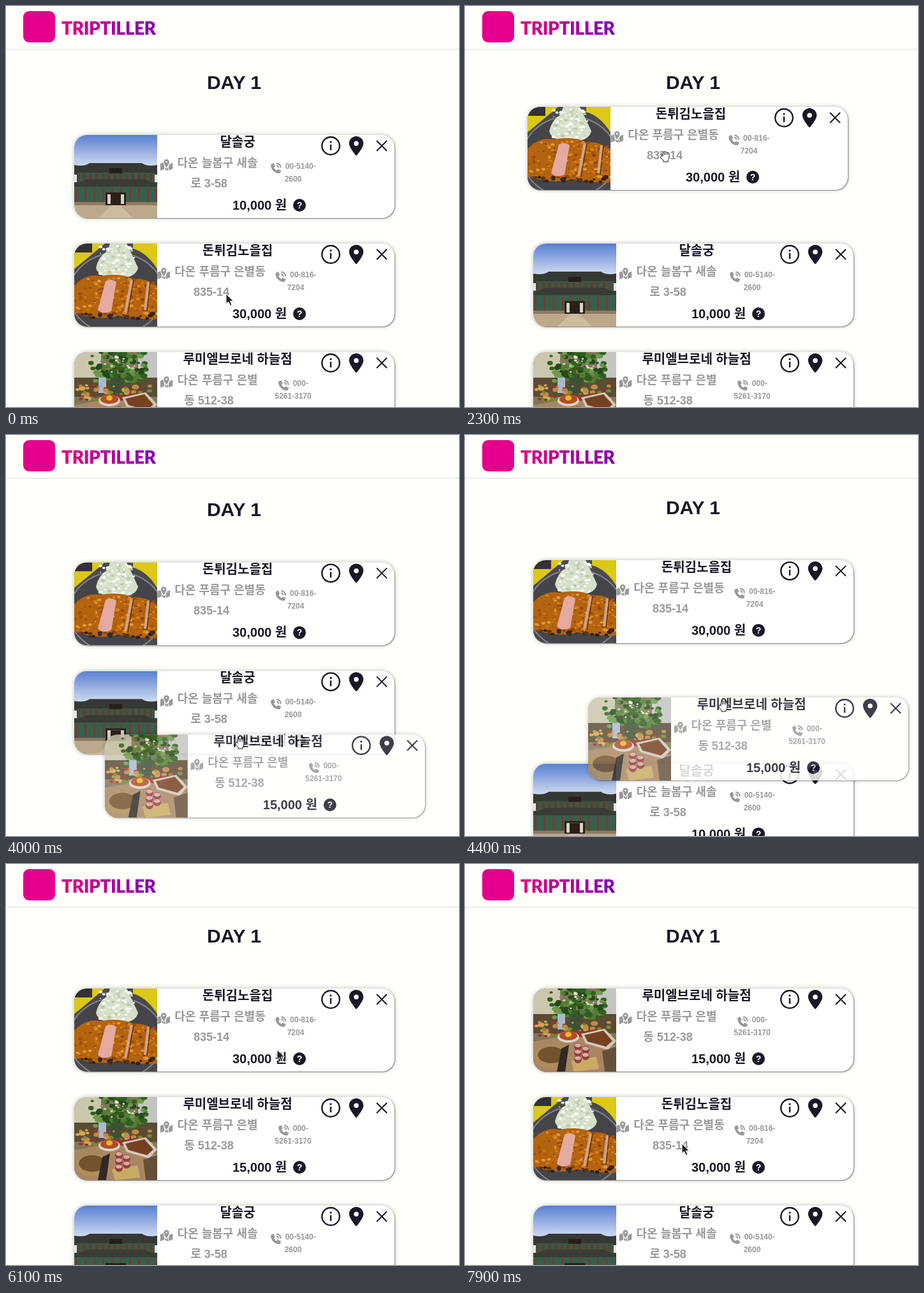
Recreate the animation shown at these times as an HTML page. Size 710 by 628 pixels, loop 8 s.

```html
<!DOCTYPE html>
<html lang="ko">
<head>
<meta charset="utf-8">
<title>Trip plan</title>
<style>
html, body { margin: 0; width: 100%; height: 100%; overflow: hidden; background: #fffffb; }
body { position: relative; font: bold 18px "Liberation Sans", "Noto Sans CJK KR", "Noto Sans CJK", sans-serif; color: #1a1727; }
header { position: absolute; left: 0; top: 0; width: 100%; height: 67px; background: #fffffb; border-bottom: 1px solid #e6e6e3; box-shadow: 0 1px 2px rgba(0,0,0,.06); }
.mark { position: absolute; left: 27px; top: 8px; width: 50px; height: 49px; border-radius: 9px; background: #e4008c; }
.brand { position: absolute; left: 87px; top: 17px; font: 900 28px/34px Lato, "Open Sans", sans-serif; letter-spacing: -.4px; color: transparent; background: linear-gradient(90deg, #e6007e, #8200b8); -webkit-background-clip: text; background-clip: text; }
#page { position: absolute; left: 0; top: 0; width: 710px; height: 628px; }
h1 { position: absolute; left: 0; top: 103px; width: 715px; margin: 0; font-size: 30px; line-height: 34px; text-align: center; }
.card { position: absolute; left: 107px; top: 0; width: 502px; height: 130px; border-radius: 20px; overflow: hidden; background: #fffffd; box-shadow: 1px 1px 1px rgba(0,0,0,.4), 0 0 7px rgba(0,0,0,.28); }
.photo, .tools { position: absolute; left: 0; top: 0; }
.row { position: absolute; transform: translateX(-50%); white-space: nowrap; text-align: center; }
.row svg { margin: -2px 2px -2px 0; }
.title { left: 256px; top: -1px; font-size: 20px; line-height: 24px; }
.address { top: 28px; line-height: 32px; color: #999; }
.address svg { vertical-align: -4px; }
.phone { top: 39px; font-size: 12px; line-height: 20px; color: #999; }
.phone svg { vertical-align: -6px; }
.price { left: 248px; top: 98px; font-size: 20px; line-height: 24px; position: absolute; white-space: nowrap; }
.help { position: absolute; left: 343px; top: 100px; width: 20px; border-radius: 50%; background: #1a1727; color: #fff; font-size: 14px; line-height: 20px; text-align: center; }
#cursor { position: absolute; left: 0; top: 0; overflow: visible; z-index: 9; }
</style>
</head>
<body>
<div id="page"><h1>DAY 1</h1></div>
<header><div class="mark"></div><div class="brand">TRIPTILLER</div></header>
<svg id="cursor" width="1" height="1">
  <path id="arrow" d="M0 0V15.500L3.700 12.200L6.300 18.300L9 17.100L6.400 11.200H11.500Z" fill="#222" stroke="#fff"/>
  <g id="hand" stroke="#111" stroke-linejoin="round" fill="#fff">
    <path d="M-3 6Q-3 4-1 4V2Q-1 0 1 0Q2-1 3.500 0Q5-1 6 .5Q9 0 9 3V8Q9 11 7 13V15H0V13L-4 8.500Q-5 6.500-3 6Z"/>
    <path d="M1.500 1V4M4 1V4M6.500 1.500V4M-1 4V7" fill="none"/>
  </g>
</svg>
<script>
const LOOP = 8000, STEP = 100, HEIGHT = 130, PITCH = 170;
const el = id => document.getElementById(id);
const slotY = i => 202 + PITCH * i;
const mix = (a, b, p) => a + (b - a) * p;
const clamp = p => Math.min(1, Math.max(0, p));
const easeOut = p => 1 - (1 - clamp(p)) ** 3;

// Photos
const box = (x, y, w, h, fill) => `<rect x="${x}" y="${y}" width="${w}" height="${h}" fill="${fill}"/>`;
const shape = (d, fill) => `<path d="${d}" fill="${fill}"/>`;
const oval = (cx, cy, rx, ry, fill, more = '') => `<ellipse cx="${cx}" cy="${cy}" rx="${rx}" ry="${ry}" fill="${fill}" ${more}/>`;
const repeat = (n, fn) => Array.from({ length: n }, (_, i) => fn(i)).join('');

function dots(n, seed, [x, y, w, h], size, colors) {
  const rnd = () => (seed = seed * 16807 % 2147483647) / 2147483647;
  return repeat(n, () => {
    const r = size * (.5 + rnd());
    return oval(x + rnd() * w, y + rnd() * h, r, r * .7, colors[rnd() * colors.length | 0]);
  });
}

const photos = {
  hall: '<linearGradient id="sky" x2="0" y2="1"><stop stop-color="#587fd2"/><stop offset=".42" stop-color="#dfe7f3"/></linearGradient>'
    + box(0, 0, 130, 130, 'url(#sky)')
    + shape('M0 47Q16 50 24 44H106Q114 50 130 47V62H0Z', '#363834')
    + box(4, 59, 122, 15, '#3f5545')
    + repeat(13, i => box(5 + i * 9.5, 61, 3, 11, '#643a2b'))
    + box(55, 52, 20, 8, '#252018')
    + shape('M0 74Q12 74 20 69H110Q118 74 130 74V82H0Z', '#393c35')
    + box(0, 81, 130, 29, '#375f4d')
    + repeat(10, i => box(2 + i * 14, 83, 3, 26, '#793a2c'))
    + box(0, 105, 130, 5, '#8f7962')
    + box(49, 90, 32, 20, '#2b2018') + box(52, 93, 26, 15, '#d8d2c5') + box(57, 93, 16, 17, '#2b2018')
    + box(0, 110, 130, 20, '#bca98b')
    + shape('M58 110H72L92 130H38Z', '#cdbc9d'),
  cutlet: box(0, 0, 130, 130, '#4a4a4e')
    + shape('M0 0H48L0 40ZM92 0H130V40Q114 14 92 8Z', '#dcc816') + box(0, 0, 28, 14, '#34303a')
    + oval(66, 78, 74, 63, '#444449', 'stroke="#85858c" stroke-width="2"')
    + shape('M34 38Q38 20 52 12L56 0H82Q90 16 100 38Q96 55 66 54Q38 54 34 38Z', '#d5dfc9')
    + dots(80, 71, [40, 2, 54, 48], 2.2, ['#f4f6ee', '#e3ead9', '#bac8ac', '#fff'])
    + shape('M0 66Q18 46 42 51Q70 45 92 55Q116 54 130 68V118Q100 120 70 113Q38 122 0 108Z', '#b4630f')
    + dots(170, 17, [0, 54, 130, 58], 2.2, ['#d88118', '#a14f08', '#c97210', '#8c4308', '#e39a34'])
    + shape('M49 59Q58 54 66 60L58 106Q46 112 37 104Z', '#e3aaa2')
    + '<path d="M90 57L80 108M116 60L111 104" stroke="#cfa48e" stroke-width="4"/><path d="M93 57L84 110M119 60L114 106" stroke="#4a2408"/>'
    + dots(24, 9, [3, 109, 120, 9], 3, ['#2c1c10', '#5d3510', '#332a25']),
  buffet: box(0, 0, 130, 130, '#807759')
    + box(0, 0, 42, 48, '#cbc7ac') + box(100, 0, 30, 58, '#c3c5c2') + box(0, 40, 130, 30, '#5a4b35')
    + dots(100, 47, [26, 0, 86, 46], 4.5, ['#315f20', '#4b8030', '#26491b', '#6e994b'])
    + dots(14, 93, [48, 2, 50, 30], 2, ['#e9edd9', '#c2d3a0'])
    + box(38, 40, 12, 24, '#aab9d0') + box(57, 40, 20, 24, '#3d5034')
    + dots(55, 57, [2, 52, 120, 25], 4, ['#c18a45', '#813c20', '#d5a653', '#728c31', '#a62e26'])
    + shape('M0 83L35 77L80 76L130 90V130H0Z', '#a98663')
    + oval(55, 76, 17, 9, '#d8d4c6') + oval(55, 74, 14, 7, '#b44a28') + oval(55, 72, 5, 4, '#e9bb25')
    + shape('M75 71L112 63L130 82L117 96L82 86Z', '#d0cabc') + shape('M80 73L110 66L124 82L114 91L85 83Z', '#774021')
    + oval(28, 107, 25, 18, '#b08d58') + oval(28, 104, 21, 13, '#72532d')
    + shape('M37 130L44 94L56 88L50 130Z', '#302a24') + shape('M59 113L99 107L103 126L64 130Z', '#c9aa63')
    + repeat(5, i => oval(70 + i % 2 * 12, 91 + i * 5, 6, 6, '#8f3f40') + oval(70 + i % 2 * 12, 89 + i * 5, 5, 3, '#dda99b'))
    + shape('M108 98L130 91V130H112Z', '#67503a')
};

// Cards
const mapIcon = '<svg width="20" height="18"><path fill="#999" fill-rule="evenodd" d="M0 7L5 5Q5.500 9 6.500 10.500V15.500L0 18ZM7.500 12L10 15L12.500 12V18L7.500 16ZM13.500 11L15 7.500L20 5.500V15L13.500 17.500ZM10 13Q5.800 8 5.800 4.200A4.200 4.200 0 0 1 14.200 4.200Q14.200 8 10 13ZM10 2.800a1.400 1.400 0 1 0 .01 0Z"/></svg>';
const phoneIcon = '<svg width="18" height="18"><path fill="#999" d="M1 3L5 1L7.500 6L5.500 8Q7 11 10 12.500L12 10.500L17 13L15 17Q8 18 3.500 12Q0 7 1 3Z"/><path fill="none" stroke="#999" stroke-width="2" d="M9.500 1.500A7 7 0 0 1 16.500 8.500M9.500 5A3.500 3.500 0 0 1 13 8.500"/></svg>';
const tools = `<svg class="tools" width="502" height="40" fill="#1a1727">
  <g fill="none" stroke="#1a1727" stroke-width="2.400">
    <circle cx="402" cy="17" r="13.800"/><path d="M402 15V24"/><path stroke-width="2" d="M474 9L490 25M490 9L474 25"/>
  </g>
  <circle cx="402" cy="11" r="1.600"/>
  <path fill-rule="evenodd" transform="translate(430.750 2) scale(.0586)" d="M216 499C267 435 384 279 384 192C384 86 298 0 192 0S0 86 0 192C0 279 117 435 168 499C181 515 203 515 216 499ZM192 128a64 64 0 1 1 0 128a64 64 0 1 1 0-128Z"/>
</svg>`;

// The shift is how far the centred address and phone sit to the right.
const places = [
  { title: '달솔궁', photo: 'hall', price: '10,000 원', address: ['다온 늘봄구 새솔', '로 3-58'], phone: ['00-5140-', '2600'], shift: 0 },
  { title: '돈튀김노을집', photo: 'cutlet', price: '30,000 원', address: ['다온 푸름구 은별동', '835-14'], phone: ['00-816-', '7204'], shift: 4 },
  { title: '루미엘브로네 하늘점', photo: 'buffet', price: '15,000 원', address: ['다온 푸름구 은별', '동 512-38'], phone: ['000-', '5261-3170'], shift: 0 }
];

function makeCard({ title, photo, price, address, phone, shift }) {
  const card = document.createElement('div');
  card.className = 'card';
  card.innerHTML = `<svg class="photo" width="130" height="130">${photos[photo]}</svg>
    <div class="row title">${title}</div>
    <div class="row address" style="left:${211 + shift}px">${mapIcon} ${address.join('<br>')}</div>
    <div class="row phone" style="left:${343 + shift}px">${phoneIcon} ${phone.join('<br>')}</div>
    <div class="price">${price}</div><div class="help">?</div>${tools}`;
  el('page').append(card);
  return card;
}
const cards = places.map(makeCard);

// Pointer stops: [time, x, y]
const stops = [
  [0, 345, 451], [400, 333, 459], [700, 320, 443], [1000, 320, 443],
  [1700, 421, 378], [1900, 411, 333], [2300, 311, 229],
  [3200, 300, 545], [3500, 316, 549], [4400, 402, 418], [4800, 352, 366], [5500, 356, 370],
  [5900, 340, 256], [6000, 340, 256], [6100, 425, 291], [6400, 442, 345], [6900, 418, 437],
  [7200, 418, 437], [7700, 343, 436], [7900, 340, 438]
];
const drags = [
  { card: 1, start: 1000, drop: 2300 },
  { card: 2, start: 3500, drop: 4800 },
  { card: 1, start: 6100, drop: 6900, grab: [340, 256] }
];
const SETTLE = 540, SWAP = 200;

const scroll = t => -7 * clamp((t - 3700) / 800);

function pointer(t) {
  const i = stops.findIndex(s => s[0] > t);
  if (i < 0) return stops[stops.length - 1].slice(1);
  const [t0, x0, y0] = stops[i - 1], [t1, x1, y1] = stops[i];
  const p = (t - t0) / (t1 - t0);
  return [mix(x0, x1, p), mix(y0, y1, p)];
}

function offset(drag, t) {
  const [x, y] = pointer(t), [gx, gy] = drag.grab;
  return [x - gx, y - gy - scroll(t) + scroll(drag.start)];
}

// A neighbour gives way once the dragged edge passes its middle.
const slots = [0, 1, 2];
for (const d of drags) {
  d.grab ??= pointer(d.start);
  d.swap = d.start;
  while (d.swap < d.drop && Math.abs(offset(d, d.swap)[1]) < PITCH - HEIGHT / 2) d.swap += STEP;
  d.from = slots[d.card];
  d.to = d.from + Math.sign(offset(d, d.drop)[1]);
  d.other = slots.indexOf(d.to);
  slots[d.card] = d.to;
  slots[d.other] = d.from;
}

function layout(t) {
  const pos = cards.map((_, i) => [0, slotY(i)]);
  for (const d of drags.filter(d => t > d.start)) {
    const [dx, dy] = offset(d, Math.min(t, d.drop));
    const p = easeOut((t - d.drop) / SETTLE);
    pos[d.card] = [mix(dx, 0, p), mix(slotY(d.from) + dy, slotY(d.to), p)];
    pos[d.other] = [0, mix(slotY(d.to), slotY(d.from), easeOut((t - d.swap) / SWAP))];
  }
  return pos;
}

const move = (node, x, y) => { node.style.transform = `translate(${x}px, ${y}px)`; };

function draw(now) {
  const t = Math.floor(now % LOOP / STEP) * STEP;
  const active = drags.find(d => t > d.start && t < d.drop + SETTLE);
  const grabbing = active && t < active.drop + 300;
  move(el('page'), 0, scroll(t));
  layout(t).forEach(([x, y], i) => {
    const lifted = active?.card === i;
    move(cards[i], x, y);
    cards[i].style.opacity = lifted && t < active.drop ? .83 : 1;
    cards[i].style.zIndex = lifted ? 2 : 1;
  });
  move(el('cursor'), ...pointer(t));
  el('hand').style.display = grabbing ? '' : 'none';
  el('arrow').style.display = grabbing ? 'none' : '';
}

const began = performance.now();
function tick() {
  draw(performance.now() - began);
  requestAnimationFrame(tick);
}
tick();
</script>
</body>
</html>
```
